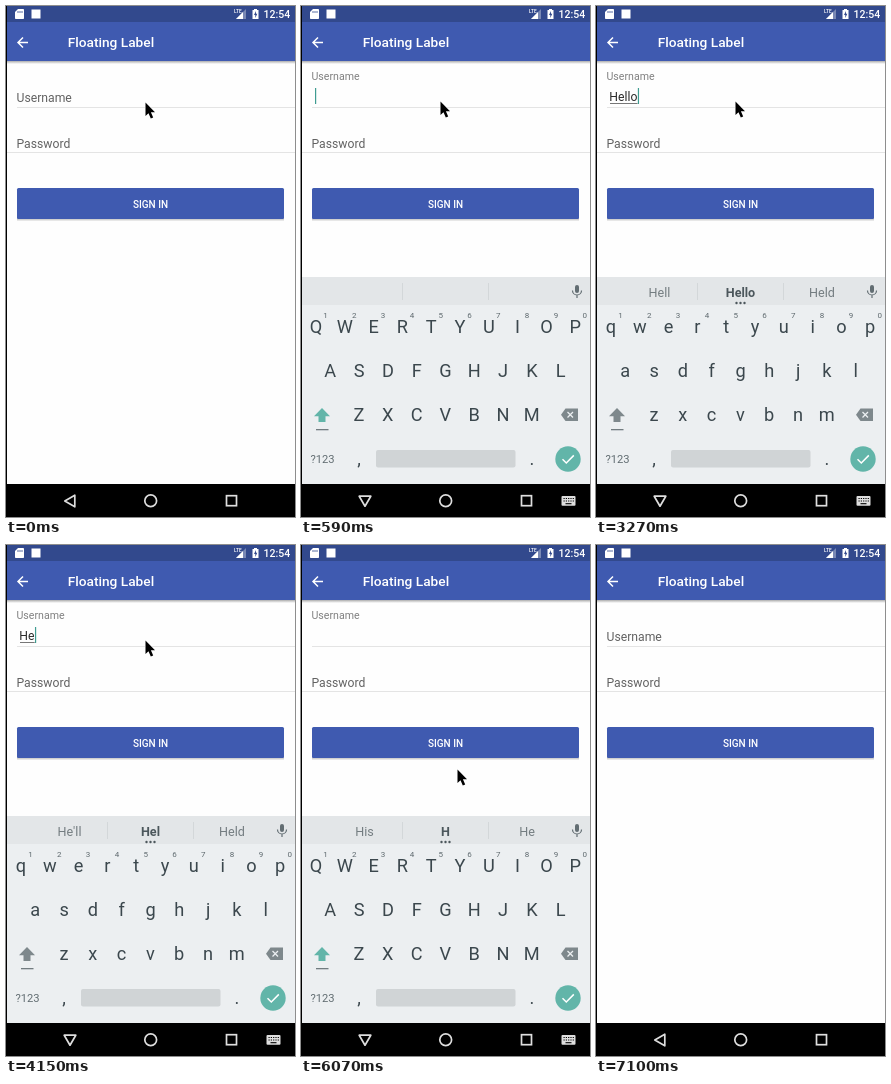
Recreate the animation shown at these times as an HTML page. Size 289 by 511 pixels, loop 8000 ms.

```html
<!DOCTYPE html>
<html lang="en">
<head>
<meta charset="utf-8">
<title>Floating label form</title>
<style>
  html, body { margin: 0; height: 100%; overflow: hidden; background: #000; }
  svg { display: block; width: 289px; height: 511px; font-family: Roboto, "Noto Sans", sans-serif; }
  text { white-space: pre; }
  .mid { text-anchor: middle; }
  .bold { font-weight: 500; }
  .key { font-size: 18.2px; fill: #3b474d; }
  .hint { font-size: 8px; fill: #5d686d; }
  .word { font-size: 12.6px; fill: #747d81; }
  .label { fill: #626262; }
  .nav { fill: none; stroke: #dedede; stroke-width: 1.7; }
</style>
</head>
<body>
<svg viewBox="0 0 289 511">
  <defs>
    <linearGradient id="shade" x2="0" y2="1">
      <stop offset="0" stop-color="#000" stop-opacity=".32"/>
      <stop offset="1" stop-color="#000" stop-opacity="0"/>
    </linearGradient>
  </defs>
  <rect width="289" height="511"/>
  <rect x="1" width="288" height="478" fill="#fefefe"/>

  <!-- status bar -->
  <rect x="1" width="288" height="16" fill="#32498d"/>
  <g fill="#fff">
    <path d="M12 3h5.2q.8 0 .8.8v8.4q0 .8-.8.8h-7.4q-.8 0-.8-.8V6z"/>
    <path d="M12 5v2m2-2v2m2-2v2" stroke="#32498d" stroke-width=".8"/>
    <rect x="25.500" y="3.500" width="9" height="9"/>
    <text class="bold" x="228" y="6.600" font-size="4.800">LTE</text>
    <path d="M240 3v10h-10z" opacity=".35"/>
    <path d="M237 6v7h-7z"/>
    <path d="M248 3h3v1h1.500v9h-6V4h1.500z"/>
    <path d="M250 5l-2 4h1.300v3l2-4.200H250z" fill="#32498d"/>
    <text class="bold" x="257.600" y="12" font-size="10.500">12:54</text>
  </g>

  <!-- toolbar -->
  <rect x="1" y="16" width="288" height="39" fill="#3f5ab0"/>
  <rect x="1" y="55" width="288" height="3" fill="url(#shade)"/>
  <path d="M22 36.500H12.500M17 31.500l-5 5 5 5" fill="none" stroke="#fff" stroke-width="1.500"/>
  <text class="bold" x="61.700" y="41.200" font-size="13.700" fill="#fff">Floating Label</text>

  <!-- form -->
  <text id="user" class="label" x="10.500">Username</text>
  <text class="label" x="10.500" y="141.500" font-size="12.200">Password</text>
  <path d="M11 101.500H289M1 146.500H289" stroke="#e4e4e4"/>
  <text id="typed" x="13.300" y="95" font-size="12.200" fill="#2b2b2b"></text>
  <rect id="under" x="14" y="97" height="1" fill="#777"/>
  <rect id="caret" y="82" width="1.200" height="16" fill="#3f9c91"/>
  <rect x="11" y="212" width="267" height="3.500" fill="url(#shade)"/>
  <rect x="11" y="182" width="267" height="31" rx="1.500" fill="#3f5ab0"/>
  <text class="mid bold" x="144.500" y="202" font-size="10" fill="#fff">SIGN IN</text>

  <!-- keyboard -->
  <g id="board">
    <rect x="1" y="271" width="288" height="240" fill="#eceff1"/>
    <rect x="1" y="271" width="288" height="28" fill="#e3e6e8"/>
    <path d="M101.500 277v17M187.500 277v17" stroke="#d3d7d9"/>
    <g id="words">
      <text class="word mid" x="63.500" y="290.500"></text>
      <text class="word mid" x="144.500" y="290.500" style="font-weight:700;fill:#4c575c"></text>
      <text class="word mid" x="226" y="290.500"></text>
    </g>
    <g id="dots" fill="#4c575c">
      <circle cx="140.500" cy="297" r="1.200"/><circle cx="144.500" cy="297" r="1.200"/><circle cx="148.500" cy="297" r="1.200"/>
    </g>
    <rect x="274" y="279" width="4" height="8" rx="2" fill="#626d72"/>
    <path d="M271.500 284.500a4.500 4.500 0 0 0 9 0M276 289v3" fill="none" stroke="#626d72" stroke-width="1.200"/>
    <g id="keys"></g>
    <path id="shift" d="M21 402l8 8.300h-4.500v5.700h-7v-5.700H13z"/>
    <rect x="15" y="423" width="12.500" height="1.300" fill="#727c80"/>
    <path d="M264.500 402.500H277v12.500h-12.500l-4.500-6.250z" fill="#7e888c"/>
    <path d="M266.500 406l5.500 5.500m0-5.500l-5.500 5.500" stroke="#eceff1" stroke-width="1.300"/>
    <text x="9.500" y="457" font-size="11.200" fill="#626d72">?123</text>
    <text class="key mid" x="58" y="459">,</text>
    <text class="key mid" x="231" y="459">.</text>
    <rect x="75" y="444" width="139.500" height="17.500" rx="2" fill="#d0d4d6"/>
    <circle cx="267" cy="453" r="12.700" fill="#62b5a9"/>
    <path d="M261.500 453.200l3.800 3.800 7.500-7.600" fill="none" stroke="#fff" stroke-width="1.500"/>
  </g>

  <!-- navigation bar -->
  <rect x="1" y="478" width="288" height="33"/>
  <path id="back" class="nav" d="M58.800 495l10-5.800v11.600z" stroke-linejoin="round"/>
  <circle class="nav" cx="144.700" cy="494.800" r="5.900"/>
  <rect class="nav" x="220.500" y="489.700" width="10" height="10"/>
  <g id="ime">
    <rect x="260.500" y="490" width="14" height="9.800" rx="1" fill="#dedede"/>
    <path d="M262.500 492.500h10.500M262.500 495h10.500" stroke="#000" stroke-width="1.200" stroke-dasharray="1.200 1.100"/>
    <path d="M264.500 497.700h6" stroke="#000" stroke-width="1.100"/>
  </g>
  <path id="mouse" d="M.5.500v13.500l3-2.700 2.300 5.200 2.400-1-2.300-5.200h4.100z" stroke="#fff" stroke-width="1.200" paint-order="stroke"/>
  <rect width="1" height="511"/>
</svg>
<script>
const $ = id => document.getElementById(id);
const LOOP = 8000;

const around = {
  '': ['', ''], H: ['His', 'He'], He: ["He'll", 'Her'],
  Hel: ["He'll", 'Held'], Hell: ["He'll", 'Help'], Hello: ['Hell', 'Held']
};

// Each step changes only the named parts; up = keyboard, lift = label (0 to 1).
const steps = [
  [0, { mouse: [139, 96], up: 0, lift: 0, text: '', hint: '', caret: 0, caps: 1 }],
  [150, { mouse: [139, 95] }],
  [450, { up: .5, lift: .5, caret: 1 }],
  [590, { up: 1, lift: 1 }],
  [890, { caret: 0 }],
  [1340, { text: 'H', hint: 'H', caret: 1, caps: 0 }],
  [1640, { text: 'He' }],
  [1780, { text: 'Hel', hint: 'He' }],
  [1930, { text: 'Hell', hint: 'Hel' }],
  [2070, { text: 'Hello' }],
  [2220, { hint: 'Hell' }],
  [2370, { hint: 'Hello' }],
  [2820, { caret: 0 }],
  [3270, { caret: 1 }],
  [3570, { text: 'Hell' }],
  [3720, { hint: 'Hell' }],
  [3860, { text: 'Hel' }],
  [4010, { hint: 'Hel' }],
  [4150, { text: 'He' }],
  [4300, { text: 'H', hint: 'He' }],
  [4450, { hint: 'H' }],
  [4590, { text: '', caps: 1 }],
  [5040, { caret: 0 }],
  [5480, { caret: 1 }],
  [5630, { mouse: [141, 110] }],
  [5780, { mouse: [148, 160] }],
  [5930, { mouse: [154, 205], caret: 0 }],
  [6070, { mouse: [156, 224] }],
  [6220, { up: .5, lift: .5 }],
  [6360, { up: 0, lift: 0 }],
  [6510, { mouse: [180, 267] }],
  [6660, { mouse: [208, 345] }],
  [6810, { mouse: [236, 430] }],
  [6960, { mouse: [252, 497] }],
  [7100, { mouse: [300, 520] }]
];

function addText(cls, x, y, str) {
  const el = document.createElementNS('http://www.w3.org/2000/svg', 'text');
  el.setAttribute('class', cls + ' mid');
  el.setAttribute('x', x);
  el.setAttribute('y', y);
  el.textContent = str;
  return $('keys').appendChild(el);
}

const keys = [];
[['QWERTYUIOP', 15], ['ASDFGHJKL', 29.3], ['ZXCVBNM', 58]].forEach(([row, left], r) => {
  [...row].forEach((ch, i) => {
    const x = left + 28.8 * i;
    keys.push([addText('key', x, 327.4 + 44 * r, ch), ch]);
    if (r === 0) addText('hint', x + 9.5, 312, (i + 1) % 10);
  });
});

const set = (id, attrs) => {
  for (const name in attrs) $(id).setAttribute(name, attrs[name]);
};

function draw(s) {
  set('user', {
    y: 95.5 - 21.8 * s.lift,
    'font-size': 12.2 - 1.6 * s.lift,
    opacity: 1 - .2 * s.lift
  });

  $('typed').textContent = s.text;
  const width = s.text ? $('typed').getComputedTextLength() : 0;
  set('under', { width: Math.max(0, width - .5) });
  set('caret', { x: 14 + Math.max(0, width - .2), opacity: s.caret });

  set('board', { opacity: s.up, transform: `translate(0 ${40 * (1 - s.up)})` });
  keys.forEach(([el, ch]) => el.textContent = s.caps ? ch : ch.toLowerCase());
  set('shift', { fill: s.caps ? '#62b5a9' : '#7e888c' });
  const [left, right] = around[s.hint];
  [left, s.hint, right].forEach((word, i) => $('words').children[i].textContent = word);
  set('dots', { opacity: s.hint ? 1 : 0 });

  set('back', { transform: s.up ? 'rotate(-90 64 495)' : '' });
  set('ime', { opacity: s.up ? 1 : 0 });
  set('mouse', { transform: `translate(${s.mouse})` });
}

const start = performance.now();
let shown = -1;
function tick() {
  const t = (performance.now() - start) % LOOP;
  const past = steps.filter(([at]) => at <= t);
  if (past.length !== shown) {
    shown = past.length;
    draw(Object.assign({}, ...past.map(step => step[1])));
  }
  requestAnimationFrame(tick);
}
tick();
</script>
</body>
</html>
```
